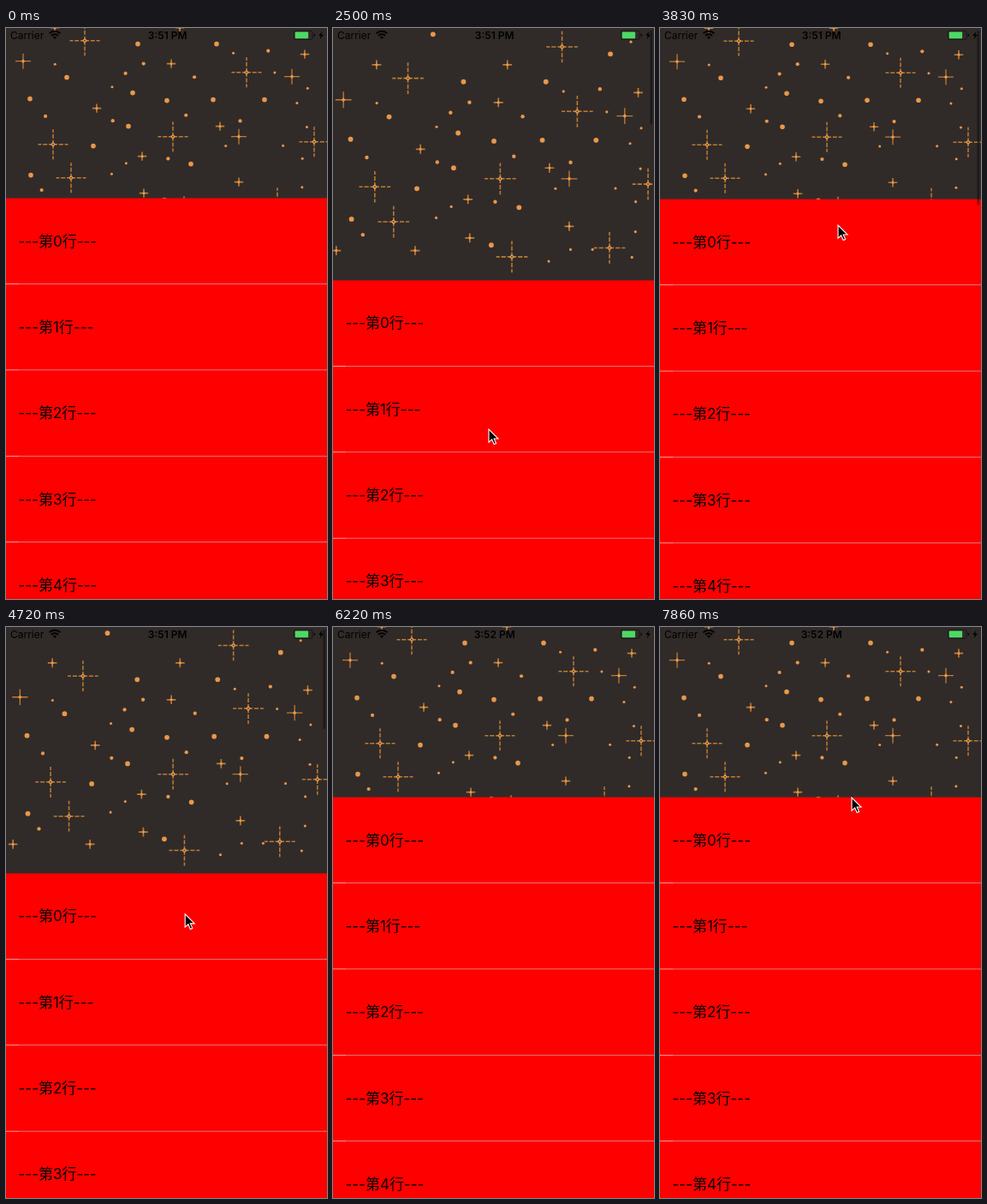
Animation of 375x666 px, one loop 8 s. Source, as an HTML page:

```html
<!DOCTYPE html>
<html lang="zh-CN">
<head>
<meta charset="utf-8">
<title>Stretchy header</title>
<style>
  html, body { margin: 0; width: 100%; height: 100%; overflow: hidden; background: #f00; }
  svg { display: block; width: 375px; height: 666px; }
  text { font-family: Inter, "Noto Sans CJK SC", "Noto Sans CJK", sans-serif; white-space: pre; }
  .row { font-size: 17px; }
  .status { font-size: 12px; }
</style>
</head>
<body>
<svg viewBox="0 0 375 666">
  <rect width="375" height="666" fill="#302b29"/>
  <g id="sky" fill="#e9974a"></g>
  <g id="list"><rect width="375" height="700" fill="#f00"/></g>
  <rect id="bar" x="370.5" y="3" width="2.6" rx="1.3" fill="#000" fill-opacity=".4"/>
  <g class="status">
    <text x="5" y="12.7">Carrier</text>
    <text id="clock" x="188.7" y="12.7" text-anchor="middle" font-weight="600"></text>
    <path d="M50.6 6.4A9 9 0 0 1 63.4 6.4M53 9A5.7 5.7 0 0 1 61 9" fill="none" stroke="#000" stroke-width="2"/>
    <path d="M57 13L54.8 10.8A3.1 3.1 0 0 1 59.2 10.8Z"/>
    <rect x="336.5" y="3.4" width="21.6" height="10" rx="2" fill="none" stroke="#000" stroke-width=".8" stroke-opacity=".6"/>
    <rect x="337.7" y="4.6" width="15.4" height="7.6" rx=".8" fill="#4cd964"/>
    <path d="M359.7 6.5a2.2 2.2 0 0 1 0 4zM369.3 3.8L365.3 9h2.5l-1.2 4.2L371 7.7h-2.7z"/>
  </g>
  <path id="cursor" d="M0 0V15.2L3.6 11.9L6.2 17.6L8.6 16.5L6.1 11H11Z" stroke="#fff" stroke-width="1.1"/>
</svg>
<script>
const LOOP = 8000, TICK = 148, PHASE = 130;
const WIDTH = 375, REST = 198.5, ROW = 100.35, PHOTO_H = 281.25;
const $ = id => document.getElementById(id);
const points = text => text.split(' ').map(p => p.split(',').map(Number));

// Key points of the night sky, in the header picture's own space
const stars = points('92,56 264,21 281,93 195,168 55,177 360,174 76,216 208,255 317,245');
const glints = points('20,80 334,98 272,168');
const pluses = points('57,41 203,41 193,83 349,72 106,135 159,191 161,234 250,156 12,248 100,248 272,221');
const beads = points('120,7 71,99 154,60 246,60 318,29 148,117 188,126 242,125 302,125 28,124 143,156 102,179 216,200 29,213 185,242');

// The faint dots fill the gaps between them
let seed = 7;
const random = () => (seed = seed * 16807 % 2147483647) / 2147483647;
const spots = [...stars, ...glints, ...pluses, ...beads];
const specks = [];
while (specks.length < 28) {
  const p = [random() * WIDTH, random() * PHOTO_H];
  if (spots.every(q => Math.hypot(p[0] - q[0], p[1] - q[1]) > 18)) {
    specks.push(p);
    spots.push(p);
  }
}

const dots = (list, size) =>
  list.map(([x, y], i) => `<circle cx="${x}" cy="${y}" r="${size(i)}"/>`).join('');
const crosses = (list, r, core, style) => list.map(([x, y]) =>
  `<path d="${['h', 'v'].map(c => `M${x} ${y}${c}${r}M${x} ${y}${c}${-r}`).join('')}" stroke="#bd7b34" ${style}/>
   <path d="M${x - core} ${y}l${core} ${-core}l${core} ${core}l${-core} ${core}z"/>`).join('');

$('sky').innerHTML =
  crosses(stars, 17.5, 3, 'stroke-width="1.5" stroke-dasharray="5 1.8"') +
  `<g fill="#6b4a2c">${dots(stars, () => 1)}</g>` +
  crosses(glints, 9, 2.3, 'stroke-width="1.3"') +
  crosses(pluses, 5.2, 2, 'stroke-width="1.6"') +
  dots(beads, () => 2.8) + dots(specks, i => i % 3 ? 1.5 : 2.1);

for (let i = 0; i < 5; i++) {
  const y = i * ROW, line = y + ROW - .6;
  $('list').insertAdjacentHTML('beforeend',
    `<text class="row" x="14.5" y="${y + 56}">---第${i}行---</text>
     <rect y="${line}" width="15" height=".6" fill="#fff"/>
     <rect x="15" y="${line}" width="360" height=".6" fill="#c8c7cc"/>`);
}

// Each pull eases out to its peak, then springs back without overshoot
const pulls = [
  { start: 600, release: 1365, peak: 108 },
  { start: 2000, release: 3225, peak: 121.2 },
  { start: 4430, release: 5050, peak: 105 },
  { start: 6520, release: 6950, peak: 67.5 },
];
const STIFF = 0.011;

function stretch(t) {
  return pulls.reduce((sum, { start, release, peak }) => {
    if (t < start) return sum;
    if (t < release) return sum + peak * (1 - (1 - (t - start) / (release - start)) ** 3);
    const k = STIFF * (t - release);
    return sum + peak * (1 + k) * Math.exp(-k);
  }, 0);
}

// Pointer stops: time, x, y
const stops = points('500,205,230 1300,198,446 1610,198,446 2000,190,265 2498,182,468 3225,184,505 3830,208,230 4430,212,235 5050,206,450 7530,213,241 7700,213,241 7826,224,199');

function pointer(t) {
  const i = stops.findIndex(s => s[0] > t);
  if (i < 1) return stops.at(i).slice(1);
  const [t0, x0, y0] = stops[i - 1], [t1, x1, y1] = stops[i];
  const u = (t - t0) / (t1 - t0);
  return [x0 + (x1 - x0) * u, y0 + (y1 - y0) * u];
}

function draw(t) {
  const d = stretch(t), h = REST + d;
  const zoom = Math.max(1, h / PHOTO_H);
  $('sky').setAttribute('transform',
    `translate(${WIDTH / 2} ${h / 2}) scale(${zoom}) translate(${-WIDTH / 2} ${-PHOTO_H / 2})`);
  $('list').setAttribute('transform', `translate(0 ${h})`);
  $('bar').setAttribute('height', 205 - d);
  $('bar').setAttribute('opacity', Math.min(1, d));
  $('clock').textContent = t < 5900 ? '3:51 PM' : '3:52 PM';
  const shown = t >= 500 && (t < 5100 || t > 7100);
  $('cursor').setAttribute('visibility', shown ? 'visible' : 'hidden');
  $('cursor').setAttribute('transform', `translate(${pointer(t)})`);
}

// The picture is refreshed only at regular ticks
function loop() {
  const t = performance.now() % LOOP;
  draw(Math.max(0, Math.floor((t - PHASE) / TICK) * TICK + PHASE));
  requestAnimationFrame(loop);
}
loop();
</script>
</body>
</html>
```
